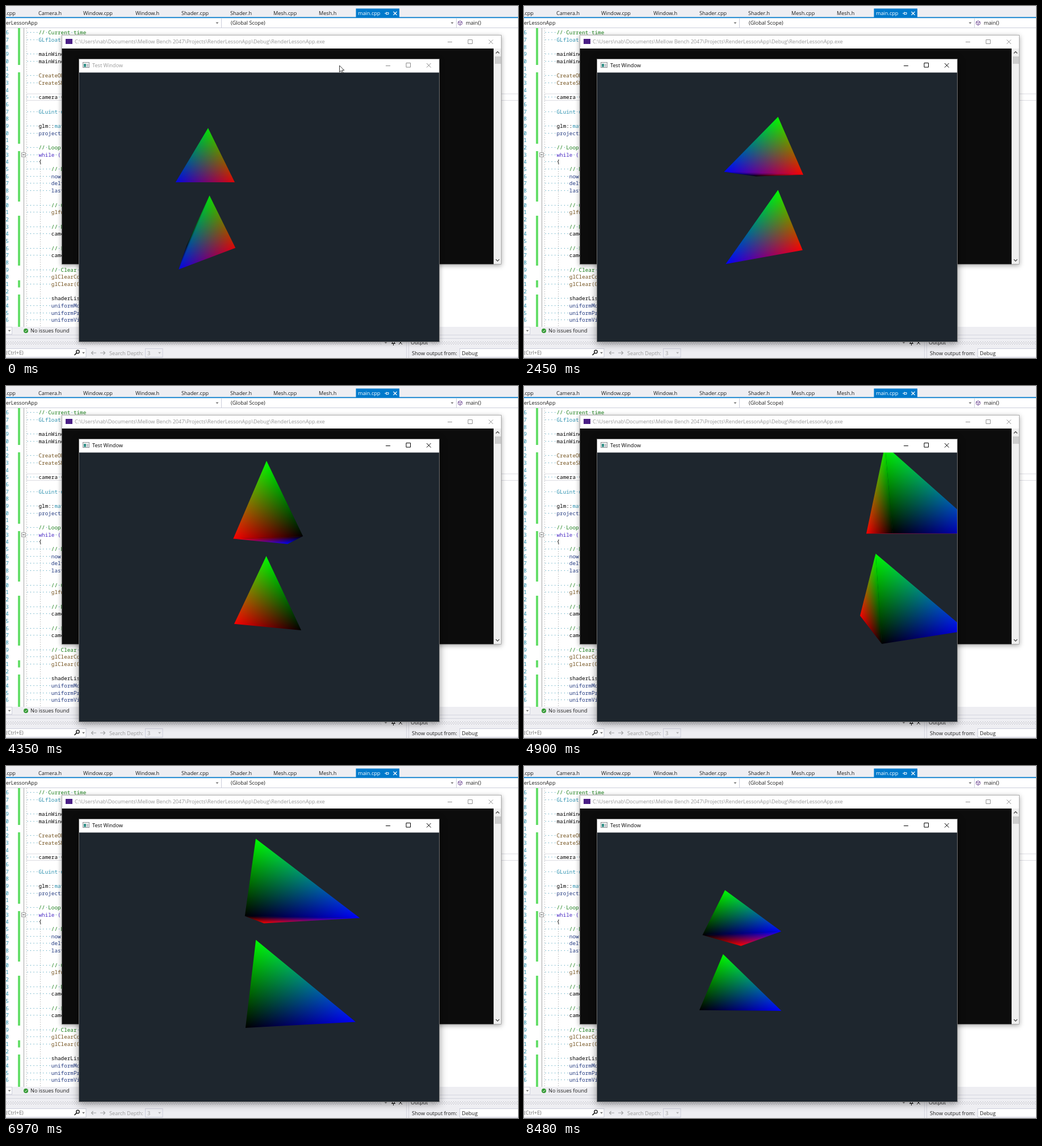
Write an HTML page with a canvas that moves like this. It is 902x621 px and loops after 8560 ms.

```html
<!DOCTYPE html>
<html lang="en">
<head>
<meta charset="utf-8">
<title>Camera test</title>
<style>
html, body { margin: 0; width: 100%; height: 100%; overflow: hidden; background: #fff; }
svg, canvas { position: absolute; left: 0; top: 0; display: block; }
#view { left: 129px; top: 117px; }
text { font: 9.15px "Open Sans", "Noto Sans", sans-serif; fill: #1e1e1e; white-space: pre; }
#code text { font: 9.3px "Noto Sans Mono", "DejaVu Sans Mono", monospace; }
.win { filter: drop-shadow(0 2px 4px rgba(0, 0, 0, .35)); }
.active #frame { filter: drop-shadow(0 3px 7px rgba(0, 0, 0, .42)); }
.dim { fill: #999; }
.line { fill: none; stroke: #1e1e1e; }
#title { fill: #999; }
#buttons { stroke: #888; }
.active #title { fill: #000; }
.active #buttons { stroke: #000; }
.active ~ #cursor { display: none; }
</style>
</head>
<body>
<svg id="desk" width="902" height="621" viewBox="0 0 902 621">
  <defs>
    <pattern id="grip" width="4" height="4" patternUnits="userSpaceOnUse">
      <path d="M0 0h1v1h-1zM2 2h1v1h-1z" fill="#a8a8b0"/>
    </pattern>
    <path id="drop" d="M-2.5 -1.2h5l-2.5 2.7z" fill="#717171"/>
  </defs>

  <!-- editor -->
  <rect width="902" height="621" fill="#fff"/>
  <rect width="902" height="20" fill="#eeeef2"/>
  <rect y="19.5" width="902" height="2" fill="#007acc"/>
  <rect x="616.5" y="4.5" width="76.500" height="16" fill="#007acc"/>
  <g id="tabs"></g>
  <path d="M667 13h3M670 10.5v5M670 11.5h4v3h-4" class="line" style="stroke:#fff"/>
  <path d="M682.5 10l6 6M688.5 10l-6 6" class="line" style="stroke:#fff;stroke-width:1.2"/>
  <rect y="21.500" width="902" height="17" fill="#fff"/>
  <path d="M0 38.5h902M379.5 22v16M793.5 22v16" fill="none" stroke="#cccedb"/>
  <text x="0" y="33.3">erLessonApp</text>
  <text x="396" y="33.3">(Global Scope)</text>
  <text x="810" y="33.3">main()</text>
  <use href="#drop" x="372" y="30"/><use href="#drop" x="786" y="30"/>
  <path d="M800 26.2l3.4 1.8v4l-3.4 1.9l-3.4 -1.9v-4zM796.6 28l3.4 1.9l3.4 -1.9M800 30v3.8" fill="none" stroke="#68408f" stroke-width=".9"/>

  <g id="code">
    <rect x="36.5" y="155" width="880" height="11.5" fill="none" stroke="#dcdce2"/>
    <path d="M31.5 39v527" stroke="#a5a5a5"/>
    <path d="M36.5 39v527M60.5 275v291" stroke="#c8c8c8" stroke-dasharray="2 2"/>
    <path d="M23 39v65M23 117v126M23 256v89M23 370v88M23 484v12.5M23 509v57" stroke="#66de6a" stroke-width="4"/>
    <rect x="27.5" y="259" width="7" height="7" fill="#fff" stroke="#8f8f8f"/>
    <path d="M29 262.5h4" stroke="#444"/>
  </g>

  <!-- status and tool panels -->
  <rect y="566" width="902" height="55" fill="#eeeef2"/>
  <rect x="-1" y="566.5" width="11.5" height="12.5" fill="#fff" stroke="#cccedb"/>
  <use href="#drop" x="6" y="573"/>
  <circle cx="35" cy="573" r="4" fill="#329932"/>
  <path d="M33 573l1.5 1.6l2.6 -3" fill="none" stroke="#fff"/>
  <text x="43" y="576.4">No issues found</text>
  <path d="M0 580.5h902M0 586.5h705M709.5 586.5h193M705.5 586v35M709.5 586v35" fill="none" stroke="#d4d5df"/>
  <rect y="591" width="662" height="6" fill="url(#grip)"/>
  <rect x="750" y="591" width="152" height="6" fill="url(#grip)"/>
  <use href="#drop" x="669" y="594"/>
  <path d="M680.5 591v4h4v-4M679 595.5h7M682.5 595v4M692 591l6 6M698 591l-6 6" class="line"/>
  <text x="713" y="597.3">Output</text>
  <rect x="-1" y="604.5" width="142" height="15" fill="#fff" stroke="#cccedb"/>
  <text x="0" y="615.2" style="fill:#717171">(Ctrl+E)</text>
  <circle cx="126.5" cy="610" r="2.7" class="line" style="stroke-width:1.4"/>
  <path d="M124.5 612.2l-4 3.6" class="line" style="stroke-width:1.8"/>
  <use href="#drop" x="136.5" y="612"/>
  <path d="M159 612h-8.5M153.5 609l-3 3l3 3M166 612h8.5M171.5 609l3 3l-3 3" fill="none" stroke="#a2a4a5" stroke-width="1.2"/>
  <text x="182" y="616" class="dim">Search Depth:</text>
  <rect x="245.5" y="604.5" width="30.5" height="15" fill="none" stroke="#cccedb"/>
  <text x="249" y="616" class="dim">3</text>
  <use href="#drop" x="270.5" y="612" opacity=".5"/>
  <text x="715" y="616">Show output from:</text>
  <rect x="799.5" y="604.5" width="110" height="15" fill="#fff" stroke="#cccedb"/>
  <text x="803" y="616">Debug</text>

  <!-- console -->
  <g class="win">
    <rect x="98" y="51" width="775" height="405" fill="#fff"/>
    <rect x="98" y="75" width="761" height="381" fill="#0c0c0c"/>
    <rect x="859" y="75" width="14" height="381" fill="#f0f0f0"/>
    <rect x="98.5" y="51.5" width="774" height="404" fill="none" stroke="#8a8a8a" stroke-width=".7"/>
  </g>
  <rect x="105" y="58" width="12" height="9" fill="#4b1f86"/>
  <text x="121" y="66.3" class="dim">C:\Users\nab\Documents\Mellow Bench 2047\Projects\RenderLessonApp\Debug\RenderLessonApp.exe</text>
  <path d="M778 63.5h8M814 59.5h7.5v7h-7.5zM850.5 59.5l7.5 7.5M858 59.5l-7.5 7.5" fill="none" stroke="#888" stroke-width=".9"/>
  <rect x="861" y="89" width="11" height="13" fill="#cdcdcd"/>
  <path d="M863 83.5l3 -3l3 3M863 447l3 3l3 -3" class="line" style="stroke:#505050;stroke-width:1.4"/>

  <!-- test window frame -->
  <g class="win" id="frame">
    <rect x="128.5" y="93.5" width="635" height="499" fill="#fff" stroke="#6a6a6a" stroke-width=".8"/>
  </g>
  <rect x="135.5" y="99.5" width="11" height="9" fill="#f4f4f4" stroke="#8a8f94"/>
  <rect x="137" y="102" width="4" height="5.5" fill="#2f8f86"/>
  <rect x="142" y="102" width="3" height="5.5" fill="#bfc6cc"/>
  <text id="title" x="152" y="108.3">Test Window</text>
  <path id="buttons" d="M669 105.5h8M705 100.5h7.5v7.5h-7.5zM741 101l7.5 7.5M748.5 101l-7.5 7.5" fill="none"/>
</svg>
<canvas id="view" width="634" height="475"></canvas>
<svg id="cursor" width="902" height="621" viewBox="0 0 902 621">
  <path d="M587.5 105v11.5l2.7 -2.5l1.9 4.3l1.9 -.8l-1.9 -4.2h3.6z" fill="#fff" stroke="#222" stroke-width=".9"/>
</svg>

<script>
const NS = 'http://www.w3.org/2000/svg';
const desk = document.getElementById('desk');
const ctx = document.getElementById('view').getContext('2d');

function add(parent, tag, attrs, content = '') {
  const el = document.createElementNS(NS, tag);
  for (const k in attrs) el.setAttribute(k, attrs[k]);
  el.textContent = content;
  return parent.appendChild(el);
}

// Editor tabs and code
const tabs = { '.cpp': -1, 'Camera.h': 57, 'Window.cpp': 136, 'Window.h': 228, 'Shader.cpp': 309,
  'Shader.h': 395, 'Mesh.cpp': 471, 'Mesh.h': 551, 'main.cpp': 620 };
for (const name in tabs) {
  add(document.getElementById('tabs'), 'text',
    { x: tabs[name], y: 16.3, style: name === 'main.cpp' ? 'fill:#fff' : '' }, name);
}

const ink = { c: '#1a7f1a', t: '#2b91af', k: '#000', f: '#74531f', v: '#1f377f', w: '#4a2bc4' };
const code = `0 4 c // Current time
1 4 t GLfloat
3 4 k mainWindow
4 4 k mainWindow
6 4 f CreateObjects
7 4 f CreateShaders
9 4 k camera =
11 4 t GLuint u
13 4 k glm::mat4
14 4 v projection
16 4 c // Loop until
17 4 w while (
18 4 k {
19 8 c // Delta
20 8 v now
21 8 v delta
22 8 v last
24 8 c // Get
25 8 f glfwPoll
27 8 c // Keys
28 8 k camera
30 8 c // Look
31 8 k camera
33 8 c // Clear window
34 8 f glClearColor
35 8 f glClear(GL
37 8 k shaderList
38 8 v uniformModel
39 8 v uniformProj
40 8 v uniformView`;
const codeBox = document.getElementById('code');
const rowY = r => 50.2 + r * 12.68;
for (let r = 0; r < 41; r++) add(codeBox, 'text', { x: -.8, y: rowY(r), style: 'fill:#2b91af' }, (r + 6) % 10);
for (const row of code.split('\n')) {
  const [, r, indent, kind, body] = row.match(/^(\d+) (\d) (\w) (.*)$/);
  const line = add(codeBox, 'text', { x: 35.2, y: rowY(+r) });
  const put = (s, fill) => add(line, 'tspan', { style: 'fill:' + fill }, s);
  put('·'.repeat(indent), ink.t);
  body.split(/( |mat4)/).forEach(s =>
    s === ' ' ? put('·', ink.t) : put(s, s === 'mat4' ? ink.t : ink[kind]));
}

// Camera path: tick, yaw, sideways offset, distance, height over the upper base, downward pitch
const START = [9.8, -.757, 3.68, 0, 5.84];
const path = [
  [0, ...START],
  [6, ...START],
  [11, 12, -.43, 2.85, 0, 12],
  [15, -30, .03, 3.3, 0, 8],
  [17, -42.3, -.34, 3.6, .01, 6.53],
  [18, -42.3, -.38, 3.6, .01, 6.53],
  [19, -42.3, -.38, 3.6, .01, 6.53],
  [20, -42.3, -.416, 3.6, .01, 6.53],
  [25, 0, -1.2, 2.85, -.08, 11],
  [31, 35, .012, 3.395, -.168, 4.57],
  [35, 62, -.25, 3.35, -.18, 5.5],
  [40, 100, 1, 3.2, -.2, 7],
  [44, 125, 1.25, 3, -.21, 5],
  [52, 178, -.36, 2.5, -.22, 1.8],
  [55, 200, .078, 2.68, -.268, 5.86],
  [61, 265, 1, 2.4, -.1, 10],
  [66, 310, 1, 3.4, .7, 26],
  [70, 336.5, .592, 4.36, 1.38, 28.8],
  [79, 325, 1.5, 3, .9, 32],
  [85, 290, .5, 2.9, 0, 16],
  [88, 283, -.034, 2.515, -.231, 5.71],
  [92, 300, .3, 1.6, -.4, 0],
  [97, 295, -.1, 2.6, -.6, -13],
  [103, 300, -.92, 3.4, -.8, -9],
  [107, 301.5, -.8, 3.52, -.85, -7.45]
];
const LOOP = 8560, TICKS = 108, FOCAL = 425.6;

// Monotone cubic, so that no value overshoots its keys
const slope = (i, k) => (path[i + 1][k] - path[i][k]) / (path[i + 1][0] - path[i][0]);
function tangent(i, k) {
  if (i === 0 || i === path.length - 1) return 0;
  const a = slope(i - 1, k), b = slope(i, k);
  return a * b > 0 ? 2 * a * b / (a + b) : 0;
}
function poseAt(tick) {
  let i = 0;
  while (i < path.length - 2 && path[i + 1][0] <= tick) i++;
  const span = path[i + 1][0] - path[i][0];
  const u = (tick - path[i][0]) / span, v = 1 - u;
  return [1, 2, 3, 4, 5].map(k =>
    path[i][k] * (1 + 2 * u) * v * v + path[i + 1][k] * (3 - 2 * u) * u * u
    + span * u * v * (tangent(i, k) * v - tangent(i + 1, k) * u));
}

// Pyramid corners: x, drop below the base plane, z, colour
const corners = [
  [-.4, 0, 0, '#000'], [0, 0, 1, '#0000fa'], [.4, 0, 0, '#fa0000'], [0, -.8, 0, '#00fa00']
];
const faces = [[0, 3, 1], [1, 3, 2], [2, 3, 0], [0, 1, 2]];

function project([x, drop, z, color], [yaw, side, dist, height, pitch], level) {
  const rad = Math.PI / 180;
  const c = Math.cos(yaw * rad), s = Math.sin(yaw * rad);
  const cp = Math.cos(pitch * rad), sp = Math.sin(pitch * rad);
  const right = side + x * c - z * s;
  const ahead = dist - x * s - z * c;
  const down = height + drop + level;
  const depth = Math.max(.1, ahead * cp + down * sp);
  return { x: 317 + FOCAL * right / depth, y: 237.5 + FOCAL * (down * cp - ahead * sp) / depth, color };
}

function shade(a, b, c) {
  const ex = c.x - b.x, ey = c.y - b.y;
  const k = ((a.x - b.x) * ex + (a.y - b.y) * ey) / (ex * ex + ey * ey);
  const g = ctx.createLinearGradient(a.x, a.y, b.x + k * ex, b.y + k * ey);
  g.addColorStop(0, a.color);
  g.addColorStop(1, '#000');
  return g;
}

function drawFace(a, b, c) {
  const area = (b.x - a.x) * (c.y - a.y) - (b.y - a.y) * (c.x - a.x);
  if (area < .5) return;
  ctx.beginPath();
  for (const p of [a, b, c]) ctx.lineTo(p.x, p.y);
  ctx.closePath();
  ctx.globalCompositeOperation = 'source-over';
  ctx.fillStyle = '#000';
  ctx.fill();
  ctx.globalCompositeOperation = 'lighter';
  for (const fill of [shade(a, b, c), shade(b, c, a), shade(c, a, b)]) {
    ctx.fillStyle = fill;
    ctx.fill();
  }
}

function wash(fill, height = 475) {
  ctx.globalCompositeOperation = 'source-over';
  ctx.fillStyle = fill;
  ctx.fillRect(0, 0, 634, height);
}

function draw(now) {
  const t = now % LOOP;
  const tick = t < 80 ? 0 : Math.min(TICKS - 1, Math.floor((t + 16) * TICKS / LOOP));
  const pose = poseAt(tick);
  desk.classList.toggle('active', tick > 0);
  wash('#1e262e');
  for (const level of [1, 0]) {
    const pts = corners.map(p => project(p, pose, level));
    for (const f of faces) drawFace(...f.map(i => pts[i]));
  }
  if (tick === 0) wash('rgba(30, 38, 46, .12)');
  wash('rgba(255, 255, 255, .4)', 1); // soft lower edge of the title bar
  requestAnimationFrame(draw);
}
requestAnimationFrame(draw);
</script>
</body>
</html>
```
